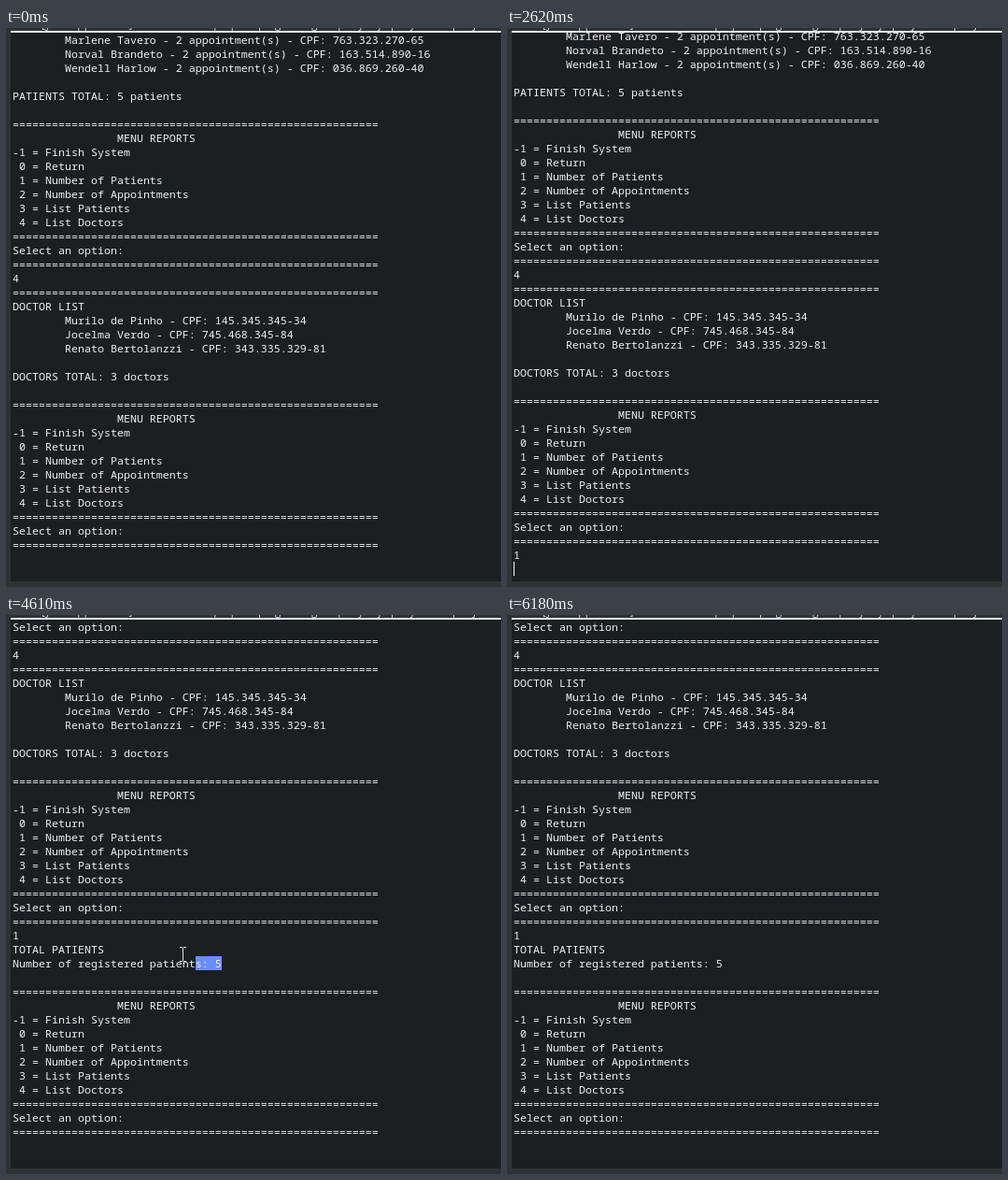
An HTML page that plays this animation: 530 by 598 pixels, repeating every 7.03 s.

```html
<!DOCTYPE html>
<html lang="en">
<head>
<meta charset="utf-8">
<title>Console menu</title>
<style>
  html, body { margin: 0; width: 100%; height: 100%; overflow: hidden; background: #2e3235; }
  #stage { position: relative; width: 530px; height: 598px; overflow: hidden; background: #2e3235; isolation: isolate; }
  #stage div, #stage pre, #stage svg { position: absolute; margin: 0; }
  #path { left: 7px; top: -13px; font: 12px/17px "Open Sans", sans-serif; color: #c3d3dc; white-space: pre; }
  #edge { left: 5px; top: 3px; width: 525px; height: 2px; background: #e2e4e5; }
  #view { left: 5px; top: 5px; width: 525px; height: 587px; overflow: hidden; background: #1b1f22; }
  #log { left: 2px; font: 11.667px/15px "Noto Sans Mono", "DejaVu Sans Mono", monospace; color: #efefef; font-variant-ligatures: none; }
  .sel { background: #6b8dfb; height: 15px; }
  #caret { width: 1px; height: 15px; background: #fff; }
  #beam { left: 0; top: 0; mix-blend-mode: difference; }
</style>
</head>
<body>
<div id="stage">
  <div id="path">Main [Java Application] C:\Users\user\.p2\pool\plugins\org.eclipse.justj.openjdk.hotspot.jre.full</div>
  <div id="edge"></div>
  <div id="view">
    <div class="sel" id="upper"></div>
    <div class="sel" id="lower"></div>
    <pre id="log"></pre>
    <div id="caret"></div>
  </div>
  <svg id="beam" width="7" height="16" shape-rendering="crispEdges" fill="#fff">
    <path d="M0 0h3v1h-3zM4 0h3v1h-3zM3 1h1v14h-1zM0 15h3v1h-3zM4 15h3v1h-3z"/>
  </svg>
</div>
<script>
const $ = id => document.getElementById(id);
const LOOP = 7030, BLINK = 544, CHAR = 7, ROW = 15;
const TYPE = 290, ENTER = 2620, REPLY = 2770;

const rule = "=".repeat(56);
const tab = " ".repeat(8);
const menu = [
  rule, tab + tab + "MENU REPORTS", "-1 = Finish System", " 0 = Return",
  " 1 = Number of Patients", " 2 = Number of Appointments",
  " 3 = List Patients", " 4 = List Doctors", rule, "Select an option:", rule
];
const patient = (name, cpf) => `${tab}${name} - 2 appointment(s) - CPF: ${cpf}`;
const doctor = (name, cpf) => `${tab}${name} - CPF: ${cpf}`;

const asked = [
  patient("Marlene Tavero", "763.323.270-65"),
  patient("Norval Brandeto", "163.514.890-16"),
  patient("Wendell Harlow", "036.869.260-40"),
  "", "PATIENTS TOTAL: 5 patients", "",
  ...menu, "4", rule, "DOCTOR LIST",
  doctor("Murilo de Pinho", "145.345.345-34"),
  doctor("Jocelma Verdo", "745.468.345-84"),
  doctor("Renato Bertolanzzi", "343.335.329-81"),
  "", "DOCTORS TOTAL: 3 doctors", "", ...menu
];
const typed = [...asked, "1"];
const replied = [...typed, "TOTAL PATIENTS", "Number of registered patients: 5", "", ...menu];

const TICK = 141.25, ENTRY = 3875;
const GRAB = 3, DROP = 9, CLICK = 12, LEAVE = 15;
const route = [
  [0, 414, 301], [2, 251, 342], [GRAB, 259, 365], [5, 186, 355], [6, 45, 345],
  [8, 15, 343], [DROP, 15, 343], [11, 206, 358], [CLICK, 206, 358],
  [13, 376, 435], [14, 518, 556], [LEAVE, 496, 581]
];

function pointer(tick) {
  const i = Math.max(1, route.findIndex(p => p[0] >= tick));
  const [t0, x0, y0] = route[i - 1], [t1, x1, y1] = route[i];
  const f = (tick - t0) / (t1 - t0);
  return [Math.round(x0 + (x1 - x0) * f), Math.round(y0 + (y1 - y0) * f)];
}

function place(id, show, x, y, width) {
  const style = $(id).style;
  style.display = show ? "block" : "none";
  style.left = x + "px";
  style.top = y + "px";
  if (width !== undefined) style.width = Math.max(0, width) + "px";
}

function drawLog(t) {
  const lines = t < TYPE ? asked : t < REPLY ? typed : replied;
  const text = lines.join("\n");
  if ($("log").textContent !== text) $("log").textContent = text;
  const scroll = t < ENTER ? 0 : t < REPLY ? 4 : 15 * ROW;
  $("log").style.top = -scroll + "px";
}

function drawCaret(t, tick) {
  const clicked = ENTRY + CLICK * TICK;
  const since = t >= clicked ? clicked : t >= ENTER ? ENTER : TYPE;
  const lit = t >= since && Math.floor((t - since) / BLINK) % 2 === 0;
  const busy = tick > GRAB && tick < CLICK || tick >= LEAVE;
  const [col, y] = t >= clicked ? [29, 24 * ROW] : t >= REPLY ? [0, 23 * ROW]
    : t >= ENTER ? [0, 38 * ROW - 4] : [1, 37 * ROW];
  place("caret", lit && !busy, 2 + col * CHAR, y);
}

// The selected end trails the pointer by half a tick
function drawSelection(tick) {
  const on = tick > GRAB && tick < CLICK;
  const [x, y] = pointer(on ? Math.min(tick, DROP) - 0.5 : 0);
  const col = Math.floor((x + 3 - CHAR) / CHAR);
  const left = 2 + col * CHAR;
  const up = y + 8 < 365;
  const low = up ? 2 : left;
  place("upper", on && up, left, 23 * ROW, 105 - left);
  place("lower", on, low, 24 * ROW, 226 - low);
}

function draw(t) {
  const tick = Math.floor((t - ENTRY) / TICK);
  const inside = tick >= 0 && tick <= LEAVE;
  drawLog(t);
  drawCaret(t, tick);
  drawSelection(tick);
  place("beam", inside, ...pointer(inside ? tick : 0));
}

const start = performance.now();
function run() {
  draw((performance.now() - start) % LOOP);
  requestAnimationFrame(run);
}
run();
</script>
</body>
</html>
```
